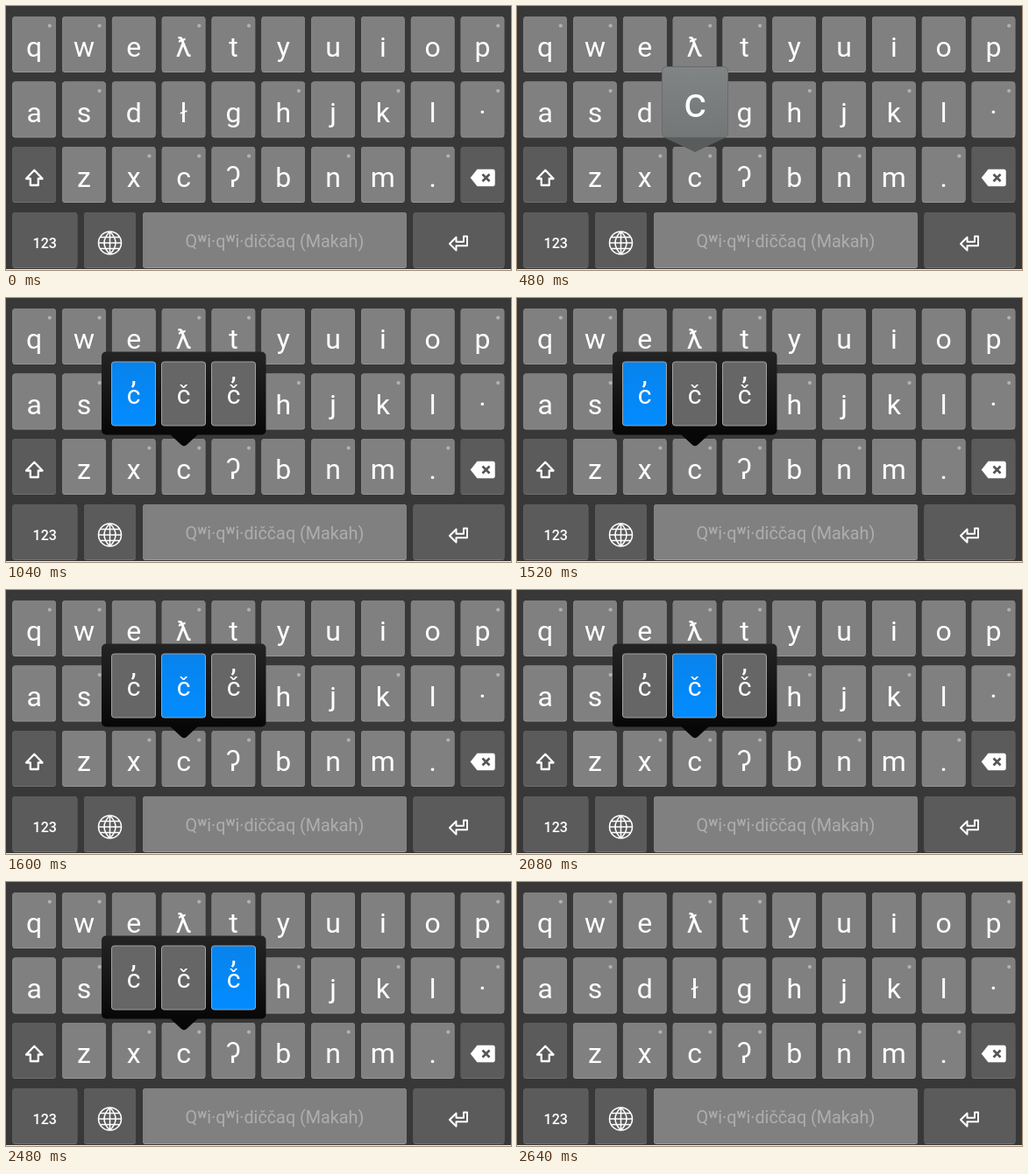
Write an HTML page that moves like this. It is 576 px wide and 302 px high and loops after 3120 ms.

```html
<!DOCTYPE html>
<html lang="en">
<head>
<meta charset="utf-8">
<title>Keyboard long press</title>
<style>
html, body { margin: 0; width: 100%; height: 100%; overflow: hidden; background: #383838; }
svg { display: block; width: 100%; height: 100%; }
text { font-family: Roboto, "Noto Sans", sans-serif; fill: #fff; text-anchor: middle; }
</style>
</head>
<body>
<svg id="stage" viewBox="0 0 576 302">
  <defs>
    <linearGradient id="previewFill" x1="0" y1="0" x2="0" y2="1">
      <stop offset="0" stop-color="#808484"/>
      <stop offset="1" stop-color="#737777"/>
    </linearGradient>
    <linearGradient id="menuFill" x1="0" y1="0" x2="0" y2="1">
      <stop offset="0" stop-color="#242424"/>
      <stop offset="1" stop-color="#070707"/>
    </linearGradient>
    <linearGradient id="selectedFill" x1="0" y1="0" x2="0" y2="1">
      <stop offset="0" stop-color="#0883ec"/>
      <stop offset="1" stop-color="#028cff"/>
    </linearGradient>
  </defs>
</svg>
<script>
const LOOP = 3120;
const PREVIEW_ON = 480, MENU_ON = 1040, SECOND_ON = 1600, THIRD_ON = 2160, MENU_OFF = 2640;
const stage = document.getElementById('stage');

function add(parent, tag, attrs, content) {
  const node = document.createElementNS('http://www.w3.org/2000/svg', tag);
  for (const name in attrs) node.setAttribute(name, attrs[name]);
  if (content) node.textContent = content;
  parent.appendChild(node);
  return node;
}

function label(parent, content, x, y, size, extra) {
  return add(parent, 'text', { x, y, 'font-size': size, ...extra }, content);
}

function key(x, y, width, dark) {
  const box = { x, width, rx: 3.5 };
  add(stage, 'rect', { ...box, y, height: 64, fill: dark ? '#757575' : '#a0a0a0' });
  add(stage, 'rect', { ...box, y, height: 63.2, fill: dark ? '#5b5b5b' : '#808080' });
}

function icon(d, extra) {
  add(stage, 'path', {
    d, fill: 'none', stroke: '#fff', 'stroke-width': 2, 'stroke-linejoin': 'round', ...extra
  });
}

// Letter rows; `hints` are the keys with a long-press dot
const rows = [
  { keys: 'qweƛtyuiop', hints: 'qwƛtp', y: 12 },
  { keys: 'asdłghjkl·', hints: 'shk·', y: 86.5 },
  { keys: '⇧zxcʔbnm.⌫', hints: 'xcʔn.', y: 161 }
];
for (const { keys, hints, y } of rows) {
  [...keys].forEach((char, i) => {
    const x = 7.3 + i * 56.82;
    const special = '⇧⌫'.includes(char);
    key(x, y, 49.6, special);
    if (!special) label(stage, char, x + 24.8, y + 46, 32);
    if (hints.includes(char)) add(stage, 'circle', { cx: x + 42.5, cy: y + 10.6, r: 2.1, fill: '#b2b2b2' });
  });
}

// Bottom row
key(7.3, 236, 74, true);
key(89, 236, 59, true);
key(156, 236, 301, false);
key(464.5, 236, 104, true);
add(stage, 'rect', { x: 0, y: 301, width: 576, height: 1, fill: '#f0f0f0' });
label(stage, '123', 44.2, 277, 16, { 'font-weight': 500 });
label(stage, 'Qʷi·qʷi·diččaq (Makah)', 306.5, 276, 19.8, { style: 'fill:#adadad' });

// Shift, backspace, enter, globe
icon('M32.3 187.8 L41.6 197.5 H36.8 V205 H27.8 V197.5 H23 Z', { 'stroke-width': 2.3 });
icon('M530 196.5 L537.5 187 H555.5 Q557.5 187 557.5 189 V204 Q557.5 206 555.5 206 H537.5 Z', { fill: '#fff', 'stroke-width': .5 });
icon('M543.5 192.5 L551.5 200.5 M551.5 192.5 L543.5 200.5', { stroke: '#555', 'stroke-width': 2.6 });
icon('M506 272 L513.5 264.5 V269.8 H522 V263.5 H526 V274.2 H513.5 V279.5 Z');
icon('M105.5 271 a13 13 0 1 0 26 0 a13 13 0 1 0 -26 0 H131.5 M118.5 258 V284' +
  'M118.5 258 Q105.5 271 118.5 284 Q131.5 271 118.5 258' +
  'M107.5 264.5 H129.5 M107.5 277.5 H129.5', { 'stroke-width': 1.5 });

// Enlarged key preview
const preview = add(stage, 'g', {});
add(preview, 'path', { d: 'M165.5 146 L203 167 L240.5 146 Z', fill: '#565858' });
add(preview, 'rect', { x: 165.5, y: 69.5, width: 75, height: 81, rx: 5, fill: 'url(#previewFill)', stroke: '#686b6b' });
add(preview, 'path', { d: 'M168 150.5 H238 L203 167 Z', fill: '#5a5c5c' });
label(preview, 'c', 203, 127, 49);

// Alternate letters menu
const menu = add(stage, 'g', {});
add(menu, 'path', { d: 'M186 155 H220 L206 168 Q203 170.5 200 168 Z', fill: '#070707' });
add(menu, 'rect', { x: 109, y: 61.5, width: 187.5, height: 95, rx: 5, fill: 'url(#menuFill)' });
const choices = [['c', 98], ['č'], ['č', 93]].map(([char, commaY], i) => {
  const x = 120.5 + i * 57;
  const cell = add(menu, 'rect', { x, y: 73, width: 50, height: 73, rx: 3, stroke: '#a2a2a2' });
  label(menu, char, x + 25.2, 121, 30);
  if (commaY) label(menu, ',', x + 25, commaY, 28, { 'font-weight': 500 });
  return cell;
});

function show(node, visible) {
  node.setAttribute('visibility', visible ? 'visible' : 'hidden');
}

function render(t) {
  show(preview, t >= PREVIEW_ON && t < MENU_ON);
  show(menu, t >= MENU_ON && t < MENU_OFF);
  const selected = (t >= SECOND_ON) + (t >= THIRD_ON);
  choices.forEach((cell, i) => cell.setAttribute('fill', i === selected ? 'url(#selectedFill)' : '#666'));
}

const start = performance.now();
function tick() {
  render((performance.now() - start) % LOOP);
  requestAnimationFrame(tick);
}
tick();
</script>
</body>
</html>
```
